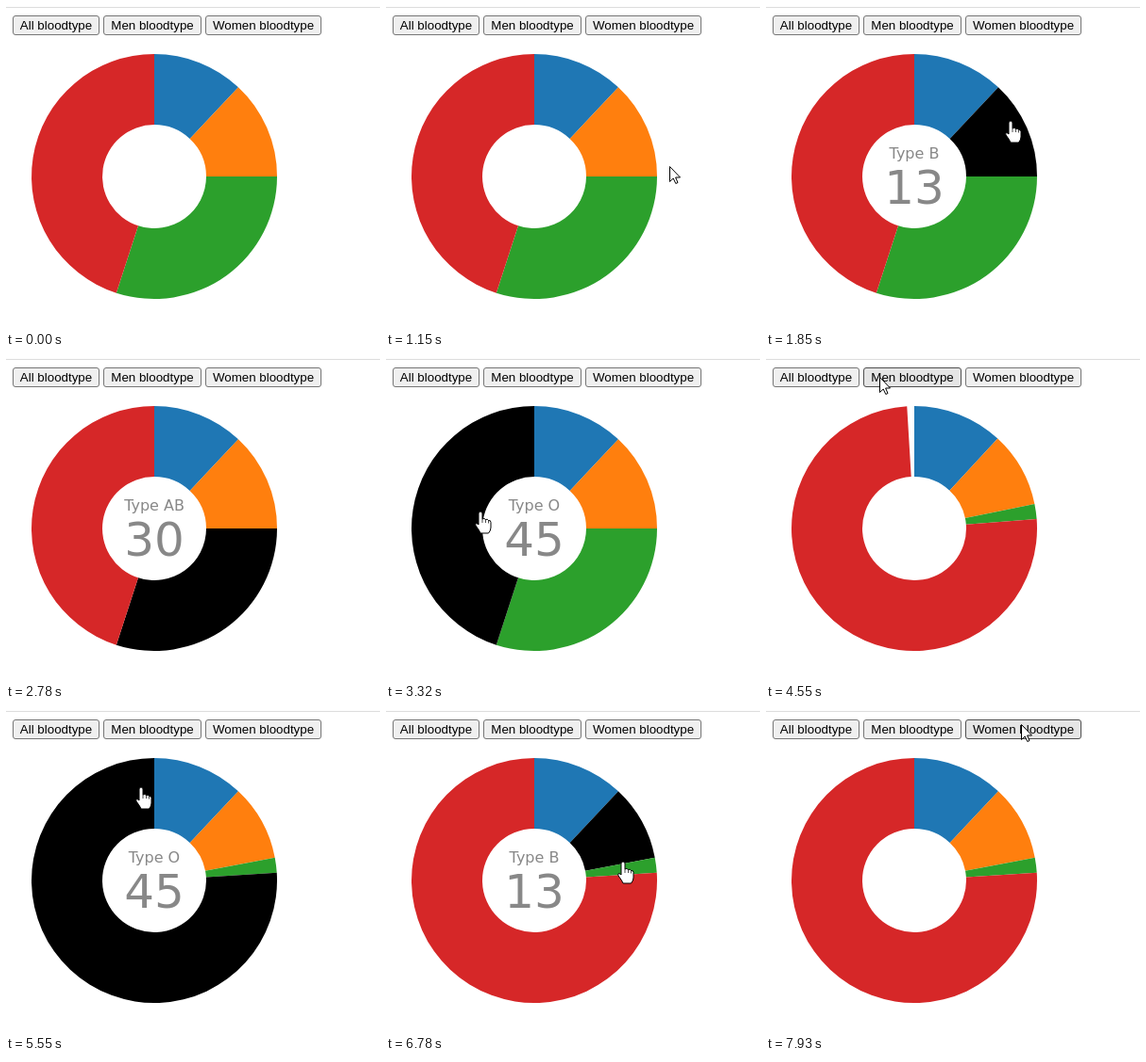
Write an HTML page that moves like this. It is 396 px wide and 344 px high and loops after 8000 ms.

```html
<!DOCTYPE html>
<html lang="en">
<head>
<meta charset="utf-8">
<title>Blood type donut</title>
<style>
  html, body { margin: 0; width: 100%; height: 100%; overflow: hidden; background: #fff; }
  body { position: relative; border-top: 1px solid #fff; box-sizing: border-box; }
  hr { position: absolute; left: 0; top: 0; width: 100%; height: 1px; margin: 0; border: 0; background: #ddd; }
  .button {
    position: absolute; top: 9px; height: 21px; box-sizing: border-box;
    border: 1px solid #767676; border-radius: 3px; background: #efefef;
    font: 13.333px/19px "Liberation Sans", Arial, sans-serif; color: #000;
    text-align: center; white-space: nowrap;
  }
  .hover { background: #e5e5e5; border-color: #4f4f4f; }
  .active { background: #f5f5f5; border-color: #8d8d8d; }
  svg { position: absolute; left: 0; top: -1px; }
  text { font-family: "DejaVu Sans", Verdana, sans-serif; fill: #888; text-anchor: middle; }
</style>
</head>
<body>
<hr>
<div class="button" style="left:7px;width:92px">All bloodtype</div>
<div class="button" style="left:103px;width:104px">Men bloodtype</div>
<div class="button" style="left:211px;width:123px">Women bloodtype</div>
<svg width="396" height="344">
  <g transform="translate(157 181)">
    <path class="slice"/><path class="slice"/><path class="slice"/><path class="slice"/>
    <text id="label" y="-19" font-size="16"></text>
    <text id="value" y="29" font-size="50"></text>
  </g>
  <circle id="click" cx="120" cy="20" r="12" fill="#ffee00" opacity=".6"/>
  <g id="cursor" fill="#fff" stroke="#000" stroke-linejoin="round">
    <path id="arrow" d="M.5 .5V16.5L4.2 13L6.8 18.5L9 17.5L6.6 12H11.5Z"/>
    <g id="hand">
      <path d="M-2 2Q-2 0 0 0Q2 0 2 2V8Q4 6.5 5.5 8.5Q7.5 7.5 8.5 9.5Q11 9 11 11.5V17Q11 20 8.5 23H0Q-1 20 -5 15Q-6 12.5 -4 12.5L-2 14Z"/>
      <path d="M2 8V12M5.5 8.5V12M8.5 9.5V12.5" fill="none" stroke-width=".7"/>
    </g>
  </g>
</svg>
<script>
const LOOP = 8000, STEP = 1000 / 13;
const COLORS = ['#1f77b4', '#ff7f0e', '#2ca02c', '#d62728'];
const NAMES = ['A', 'B', 'AB', 'O'];
const ALL = [12, 13, 30, 45], MEN = [12, 10, 2, 76];
const OUTER = 130, INNER = 55;

// Cursor path: step, x, y
const PATH = [
  [6, 331, 325], [9, 350, 278], [11, 350, 278], [15, 300, 170], [19, 205, 85],
  [22, 205, 85], [24, 259, 122], [25, 262, 138], [27, 262, 138], [31, 235, 235],
  [33, 235, 235], [37, 90, 235], [40, 90, 235], [49, 120, 20], [64, 120, 20],
  [69, 143, 82], [72, 143, 82], [74, 181, 82], [76, 181, 82], [79, 219, 113],
  [81, 219, 113], [83, 233, 145], [85, 233, 145], [88, 251, 161], [98, 251, 161],
  [103, 270, 15]
];
// Hovered slice from a step on, -1 for none
const HOVER = [
  [0, -1], [16, 1], [19, 0], [23, 1], [29, 2], [37, 3], [48, -1],
  [67, 3], [73, 0], [82, 1], [91, 2], [99, 1], [101, -1]
];

const $ = id => document.getElementById(id);
const slices = document.querySelectorAll('.slice');
const buttons = document.querySelectorAll('.button');
const show = (el, on) => el.setAttribute('visibility', on ? 'visible' : 'hidden');
const within = (n, from, to) => n >= from && n <= to;
const easeInOut = k => k < .5 ? 4 * k ** 3 : 1 - 4 * (1 - k) ** 3;

function cursorAt(n) {
  const i = PATH.findIndex(p => p[0] > n);
  if (i < 0) return PATH[PATH.length - 1].slice(1);
  if (i === 0) return PATH[0].slice(1);
  const [a, x, y] = PATH[i - 1], [b, u, v] = PATH[i], k = (n - a) / (b - a);
  return [x + (u - x) * k, y + (v - y) * k];
}

function arcPath(from, to) {
  const at = (r, f) => [r * Math.sin(f * 2 * Math.PI), -r * Math.cos(f * 2 * Math.PI)];
  const large = to - from > .5 ? 1 : 0;
  return `M${at(OUTER, from)}A130 130 0 ${large} 1 ${at(OUTER, to)}` +
    `L${at(INNER, to)}A55 55 0 ${large} 0 ${at(INNER, from)}Z`;
}

function drawPie(data, sweep, hover) {
  let sum = 0;
  data.forEach((v, i) => {
    slices[i].setAttribute('d', arcPath(sum / 100 * sweep, (sum + v) / 100 * sweep));
    slices[i].setAttribute('fill', i === hover ? '#000' : COLORS[i]);
    sum += v;
  });
}

function draw(time) {
  const n = Math.floor(time % LOOP / STEP + .3);
  const hover = HOVER.filter(h => h[0] <= n).pop()[1];
  const sweep = within(n, 53, 59) ? easeInOut((n - 52.5) / 7.5) : 1;
  drawPie(n < 53 ? ALL : MEN, sweep, hover);

  $('label').textContent = hover < 0 ? '' : 'Type ' + NAMES[hover];
  $('value').textContent = hover < 0 ? '' : ALL[hover];

  const pressed = within(n, 52, 53);
  buttons[1].className = 'button' + (pressed ? ' active' : within(n, 49, 64) ? ' hover' : '');
  buttons[2].className = 'button' + (n >= 103 ? ' hover' : '');
  show($('click'), pressed);

  const visible = n >= 6 && n !== 36;
  $('cursor').setAttribute('transform', `translate(${cursorAt(n).map(Math.round)})`);
  show($('arrow'), visible && hover < 0);
  show($('hand'), visible && hover >= 0);
}

const start = performance.now();
(function tick() {
  draw(performance.now() - start);
  requestAnimationFrame(tick);
})();
</script>
</body>
</html>
```
